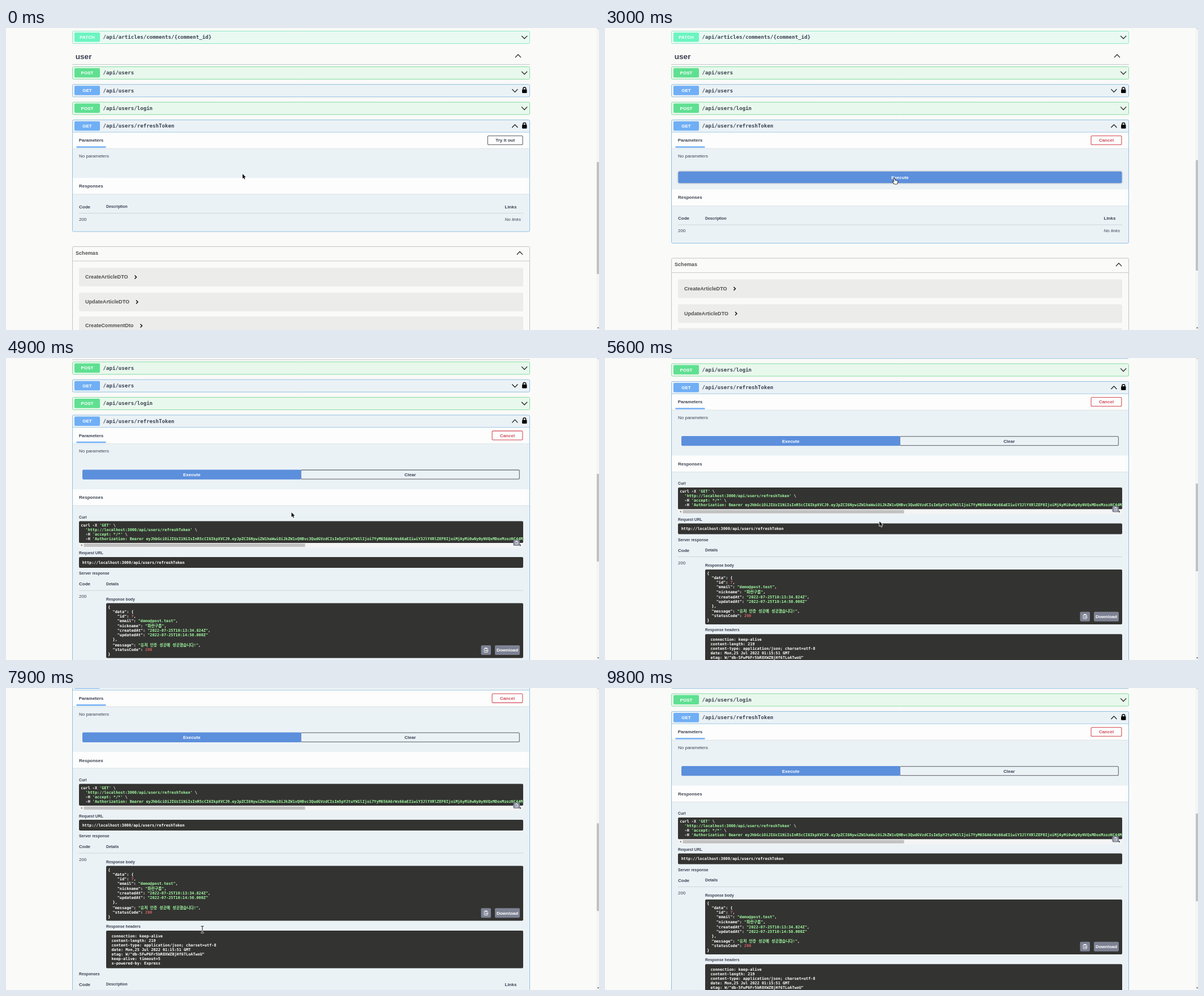
An HTML page with a canvas that plays this animation: 1048x534 px, repeating every 10 s.

```html
<!DOCTYPE html>
<html lang="en">
<head>
<meta charset="utf-8">
<title>API explorer</title>
<style>
html, body { margin: 0; width: 100%; height: 100%; overflow: hidden; background: #fafaf8; }
canvas { display: block; width: 1048px; height: 534px; }
</style>
</head>
<body>
<canvas id="stage" width="1048" height="534"></canvas>
<script>
const W = 1048, H = 534, LOOP = 10000;
const ctx = document.getElementById('stage').getContext('2d');
const SANS = '"Liberation Sans", Arial, sans-serif';
const MONO = '"DejaVu Sans Mono", "Noto Sans CJK KR", "Noto Sans CJK", monospace';
const INK = '#3b4151', PAGE = '#fafaf8', DARK = '#333331', GREEN = '#a2fca2', RED = '#d36363';
const GET = { fill: '#70aff5', bg: '#ebf2f6', edge: '#90c0e0' };
const POST = { fill: '#5fe091', bg: '#e8f8ec', edge: '#83dda3' };
const PATCH = { fill: '#6bf5c0', bg: '#e9faf3', edge: '#8fe9c9' };

const TOKEN = 'eyJhbGciOiJIUzI1NiIsInR5cCI6IkpXVCJ9.eyJpZCI6NywiZW1haWwiOiJkZW1vQHBvc3QudGVzdCIs' +
  'Im5pY2tuYW1lIjoi7YyM656A6rWs66aEIiwiY3JlYXRlZEF0IjoiMjAyMi0wNy0yNVQxMDoxMzozNC44MjRa';
const CURL = [
  "curl -X 'GET' \\",
  "  'http://localhost:3000/api/users/refreshToken' \\",
  "  -H 'accept: */*' \\",
  `  -H 'Authorization: Bearer ${TOKEN}'`
];
const BODY = [
  [502, '{'], [510, '  "data": {'], [518, '    "id": 7,'],
  [526, '    "email": "demo@post.test",'], [535, '    "nickname": "파란구름",'],
  [543.3, '    "createdAt": "2022-07-25T10:13:34.824Z",'],
  [551.3, '    "updatedAt": "2022-07-25T10:14:50.000Z"'], [559.3, '  },'],
  [568.7, '  "message": "유저 인증 성공에 성공했습니다!",'],
  [577, '  "statusCode": 200'], [585, '}']
];
const HEADERS = [
  'connection: keep-alive', 'content-length: 219',
  'content-type: application/json; charset=utf-8', 'date: Mon,25 Jul 2022 01:15:51 GMT',
  'etag: W/"db-5FwP6Fr5bR8XWZBjHf6TLoATwoU"', 'keep-alive: timeout=5', 'x-powered-by: Express'
];

// Pointer path: time, x, y
const PATH = [
  [0, 418, 258], [700, 418, 258], [800, 743.5, 274.5], [900, 743.5, 274.5],
  [1300, 840, 212], [1500, 887, 176], [1600, 887, 181], [1700, 886, 189],
  [2000, 886, 196], [2200, 886, 196], [2700, 511, 265], [2800, 511, 265],
  [3000, 511.5, 266], [4500, 511.5, 266], [4800, 504.5, 273], [5300, 504.5, 273],
  [5400, 492.5, 281.5], [5500, 492.5, 281.5], [5700, 477.5, 296.5], [5800, 477.5, 296.5],
  [6300, 347, 419.5], [6400, 347, 419.5], [6500, 361, 422], [6600, 347, 424],
  [7300, 347, 424], [7400, 347, 427], [8100, 347, 427], [8200, 350, 431],
  [9200, 350, 431], [9700, 5, 10]
];

const clamp = x => Math.min(1, Math.max(0, x));
const mix = (a, b, k) => a + (b - a) * k;
const inOut = x => x < .5 ? 4 * x ** 3 : 1 - 4 * (1 - x) ** 3;
const notch = (t, start, span) => 60.5 * inOut(clamp((t - start) / span));
const scrollAt = t => notch(t, 4560, 240) + notch(t, 4860, 240) + notch(t, 7600, 360) - notch(t, 8560, 400);

function pointAt(t) {
  const i = PATH.findIndex(p => p[0] > t);
  if (i < 0) return PATH[PATH.length - 1].slice(1);
  const a = PATH[i - 1], b = PATH[i], k = (t - a[0]) / (b[0] - a[0]);
  return [mix(a[1], b[1], k), mix(a[2], b[2], k)];
}

function rect(x, y, w, h, fill, r = 0, stroke, lw = 1) {
  ctx.beginPath();
  ctx.roundRect(x, y, w, h, r);
  if (fill) { ctx.fillStyle = fill; ctx.fill(); }
  if (stroke) { ctx.strokeStyle = stroke; ctx.lineWidth = lw; ctx.stroke(); }
}

// y is the middle of the capitals
function text(s, x, y, size = 8, { font = SANS, style = 'bold', color = INK, align = 'left' } = {}) {
  ctx.font = `${style} ${size}px ${font}`;
  ctx.fillStyle = color;
  ctx.textAlign = align;
  ctx.fillText(s, x, y + size * .36);
  return ctx.measureText(s).width;
}

const mono = (s, x, y, color = '#fff', size = 6.83) => text(s, x, y, size, { font: MONO, color });

function runs(parts, x, y) {
  for (const [s, color] of parts) x += mono(s, x, y, color);
}

function json(line, x, y) {
  const [, key, value, comma] = line.match(/^(\s*(?:"\w+": )?)(.*?)(,?)$/);
  const color = value[0] === '"' ? GREEN : /\d/.test(value[0]) ? RED : '#fff';
  runs([[key, '#fff'], [value, color], [comma, '#fff']], x, y);
}

function lines(points, color = '#111', lw = 1.2) {
  ctx.beginPath();
  points.forEach(([x, y]) => ctx.lineTo(x, y));
  ctx.strokeStyle = color;
  ctx.lineWidth = lw;
  ctx.stroke();
}

function shape(x, y, points, fill, stroke, lw = 1) {
  ctx.beginPath();
  points.forEach(([a, b]) => ctx.lineTo(x + a, y + b));
  ctx.closePath();
  ctx.lineJoin = 'round';
  if (stroke) { ctx.strokeStyle = stroke; ctx.lineWidth = lw; ctx.stroke(); }
  ctx.fillStyle = fill;
  ctx.fill();
  ctx.lineJoin = 'miter';
}

const rule = (y, color = '#cfd5d9', x = 129, end = 914) => rect(x, y, end - x, 1, color);
const chevron = (x, y, up) => {
  const d = up ? -2.6 : 2.6;
  lines([[x - 5, y - d], [x, y + d], [x + 5, y - d]]);
};

function lock(x, y) {
  rect(x - 4.2, y - 1.2, 8.4, 6.6, '#000', 1);
  lines([[x - 2.4, y - 1], [x - 2.4, y - 3.3], [x - 1.2, y - 4.6], [x + 1.2, y - 4.6], [x + 2.4, y - 3.3], [x + 2.4, y - 1]], '#000', 1.5);
}

function copyButton(x, y, w, h, size = 8) {
  rect(x, y, w, h, '#7d8293', 2);
  const cx = x + w / 2, cy = y + h / 2, s = size / 8;
  rect(cx - 3 * s, cy - 3.2 * s, 6 * s, 7 * s, null, .5, '#fff', .9 * s);
  rect(cx - 1.6 * s, cy - 4.3 * s, 3.2 * s, 2 * s, '#fff');
  lines([[cx + 4 * s, cy + .8 * s], [cx - .8 * s, cy + .8 * s]], '#fff', .9 * s);
  lines([[cx + .8 * s, cy - .8 * s], [cx - .8 * s, cy + .8 * s], [cx + .8 * s, cy + 2.4 * s]], '#fff', .8 * s);
}

function row(y, kind, name, path, { locked, open, hover, h = 22 } = {}) {
  rect(117.5, y + .5, 808, h, kind.bg, 2, kind.edge);
  rect(121, y + 3, 45, 16.5, kind.fill, 2);
  text(name, 143.5, y + 11.2, 8, { color: '#fff', align: 'center' });
  mono(path, 171.5, y + 11.2, INK, 9.1);
  const shift = hover ? 13.7 : 0;
  chevron((locked ? 899.4 : 916.2) - shift, y + 11.4, open);
  if (locked) lock(916.3 - shift, y + 10.3);
  if (hover) copyButton(910.7, y + 3.5, 9.6, 15, 6.5);
}

function strip(y, h = 28.5) {
  rect(118, y, 807, h, '#fcfdfc');
  rect(118, y + h, 807, 1, '#dde3e6');
}

function outlineButton(label, x, y, w, h, edge, color = INK) {
  rect(x + .6, y + .6, w - 1.2, h - 1.2, null, 2, edge, 1.3);
  text(label, x + w / 2, y + h / 2 + .1, 8, { color, align: 'center' });
}

function executeButton(x, y, w, h, fill, shadow) {
  ctx.save();
  ctx.shadowColor = `rgba(0,0,0,${.35 * shadow})`;
  ctx.shadowBlur = 3;
  rect(x, y, w, h, fill, 2);
  ctx.restore();
  text('Execute', x + w / 2, y + h / 2, 8, { color: '#fff', align: 'center' });
}

function tableHead(y) {
  text('Code', 129, y);
  text('Description', 177, y, 6.83);
  text('Links', 881.5, y);
}

function emptyResponses(d) {
  strip(265 + d);
  text('Responses', 129, 279 + d);
  tableHead(315.7 + d);
  rule(327 + d);
  text('200', 129, 338 + d, 8, { style: 'normal' });
  text('No links', 881.5, 338 + d, 8, { style: 'italic' });
}

function schemas(d) {
  rect(117.5, 386.5 + d, 808, 300, null, 2, '#c3c4c4');
  text('Schemas', 123, 397.7 + d, 9.1, { color: '#505050' });
  chevron(908, 398 + d, true);
  rule(411.5 + d, '#c8c9c9', 118, 925);
  [['CreateArticleDTO', 424, 229], ['UpdateArticleDTO', 468, 231.5], ['CreateCommentDto', 510, 239]].forEach(([name, y, x]) => {
    rect(129, y + d, 785, 33, '#ececea', 2);
    text(name, 140, y + 16.2 + d, 9.1, { color: '#505050' });
    lines([[x - 1.5, y + 13.5 + d], [x + 1.5, y + 16.5 + d], [x - 1.5, y + 19.5 + d]], '#000', 1.4);
  });
}

function curlBox() {
  text('Curl', 129, 343, 6.83);
  rect(129, 350, 785, 38.5, DARK, 2);
  ctx.save();
  ctx.beginPath();
  ctx.rect(129, 350, 785, 38.5);
  ctx.clip();
  CURL.forEach((line, i) => runs(line.split(/('[^']*')/).map((s, n) => [s, n % 2 ? GREEN : '#fff']), 132.3, 357 + 8 * i));
  ctx.restore();
  rect(129, 388.5, 785, 8.5, '#f3f4f3');
  rect(137.5, 389.7, 391, 6, '#c1c1c1');
  shape(132, 392.7, [[0, 0], [2.5, -2], [2.5, 2]], '#777');
  shape(910.5, 392.7, [[0, 0], [-2.5, -2], [-2.5, 2]], '#444');
  copyButton(896.5, 383, 11.5, 10.5, 6.5);
}

function liveResponse() {
  strip(293.5);
  text('Responses', 129, 308);
  curlBox();
  text('Request URL', 129, 406.5, 6.83);
  rect(129, 413.5, 785, 19, DARK, 2);
  mono('http://localhost:3000/api/users/refreshToken', 134.7, 423);
  text('Server response', 129, 442.2, 6.83);
  text('Code', 129, 460.8);
  text('Details', 177, 460.8, 6.83);
  rule(472);
  text('200', 129, 483, 8, { style: 'normal' });
  text('Response body', 177, 488, 6.83);
  rect(177, 495, 737, 97, DARK, 2);
  BODY.forEach(([y, s]) => json(s, 180.3, y));
  copyButton(839.5, 569.7, 17.5, 17);
  rect(864, 569.7, 44, 17, '#7d8293', 2);
  text('Download', 886, 578.2, 8, { color: '#fff', align: 'center' });
  text('Response headers', 177, 602, 6.83);
  rect(177, 609.3, 737, 66.5, DARK, 2);
  HEADERS.forEach((s, i) => mono(s, 186.5, 618.5 + 8 * i));
  text('Responses', 129, 685.7, 6.83);
  tableHead(704);
}

function page(t) {
  const trying = t >= 2300, done = t >= 3800;
  const grow = clamp((t - 3830) / 300), p = 1 - (1 - grow) ** 2;
  const d = trying ? 20.5 : 0, slack = 3.4 * (1 - p);
  row(5, PATCH, 'PATCH', '/api/articles/comments/{comment_id}');
  text('user', 122.7, 50.5, 13.65);
  chevron(905, 49.5, true);
  rule(64, '#c6c8c9', 117, 926);
  row(68, POST, 'POST', '/api/users');
  row(99.3, GET, 'GET', '/api/users', { locked: true });
  row(130.6, POST, 'POST', '/api/users/login');
  row(162, GET, 'GET', '/api/users/refreshToken', {
    locked: true, open: true, hover: t >= 1400 && t < 1700, h: done ? 800 : 197.5 + d
  });
  rule(183.8, GET.edge, 118, 925);
  strip(184.8, 28);
  text('Parameters', 128.7, 198.6);
  rect(124.5, 209.3, 52, 2.5, GET.fill);
  if (trying) outlineButton('Cancel', 858.5, 190, 55, 17, '#dc6670', '#d34b5c');
  else outlineButton('Try it out', 850.7, 190, 63, 17, '#777a80');
  text('No parameters', 129, 226, 8, { style: 'normal' });
  if (done) {
    const g = Math.max(p, .01), free = 773 - 57 - 2 * 9.7 * (1 - p);
    const w = 28.5 + 2 * 9.7 * (1 - p) + free * g / (g + 1);
    outlineButton('Clear', 135 + w - 1, 259, 774 - w, 17.3 + slack, '#777a80');
    executeButton(135, 259, w, 17.3 + slack, p < 1 ? '#6899dc' : '#5c8fdc', 0);
    ctx.save();
    ctx.translate(0, slack);
    liveResponse();
    ctx.restore();
  } else {
    if (trying) executeButton(129.4, 253.7, 784, 20.5, '#5c8fdc', clamp((t - 2800) / 200));
    emptyResponses(d);
    schemas(d);
  }
}

function scrollbar(t, s) {
  const [y, h] = t < 2300 ? [237, 198] : t < 3800 ? [233.6, 195.3] : [187 + .29 * s, 155];
  rect(1043, 0, 5, H, '#f5f5f4');
  rect(1044, y, 4, h, '#c1c1c1');
  shape(1046.5, .5, [[-1.5, 1], [0, -.5], [1.5, 1]], '#aaa');
  shape(1046.5, 530.5, [[-1.7, -1], [1.7, -1], [0, 1]], '#444');
}

const ARROW = [[0, 0], [0, 8.2], [1.9, 6.5], [3.2, 9.6], [4.6, 9], [3.3, 6], [5.8, 5.8]];
const HAND = [[-1, .3], [.4, .2], [.9, 3.5], [5, 4.3], [5.7, 5.3], [5.3, 8], [4.4, 9.7], [.2, 9.7], [-2.8, 6.3], [-2.4, 5.4], [-.7, 6.2]];

function beam(x, y) {
  for (const [color, lw] of [['#fff', 2.2], ['#111', 1]]) {
    lines([[x, y - 5.5], [x, y + 5.5]], color, lw);
    lines([[x - 2.5, y - 5.7], [x + 2.5, y - 5.7]], color, lw);
    lines([[x - 2.5, y + 5.7], [x + 2.5, y + 5.7]], color, lw);
  }
}

function pointer(t) {
  if (t >= 9800) return;
  const [x, y] = pointAt(t);
  const hand = (t >= 1400 && t < 2400) || (t >= 2700 && t < 4600);
  if (t >= 6100 && t < 9400) beam(x, y);
  else if (hand) shape(x, y, HAND, '#fff', '#222', 1.8);
  else shape(x, y, ARROW, '#111', '#fff', 1.4);
}

function draw(now) {
  const t = Math.floor(now % LOOP / 100) * 100, s = scrollAt(t);
  rect(0, 0, W, H, PAGE);
  ctx.save();
  ctx.translate(0, -s);
  page(t);
  ctx.restore();
  scrollbar(t, s);
  pointer(t);
}

const start = performance.now();
function tick() {
  draw(performance.now() - start);
  requestAnimationFrame(tick);
}
tick();
</script>
</body>
</html>
```
